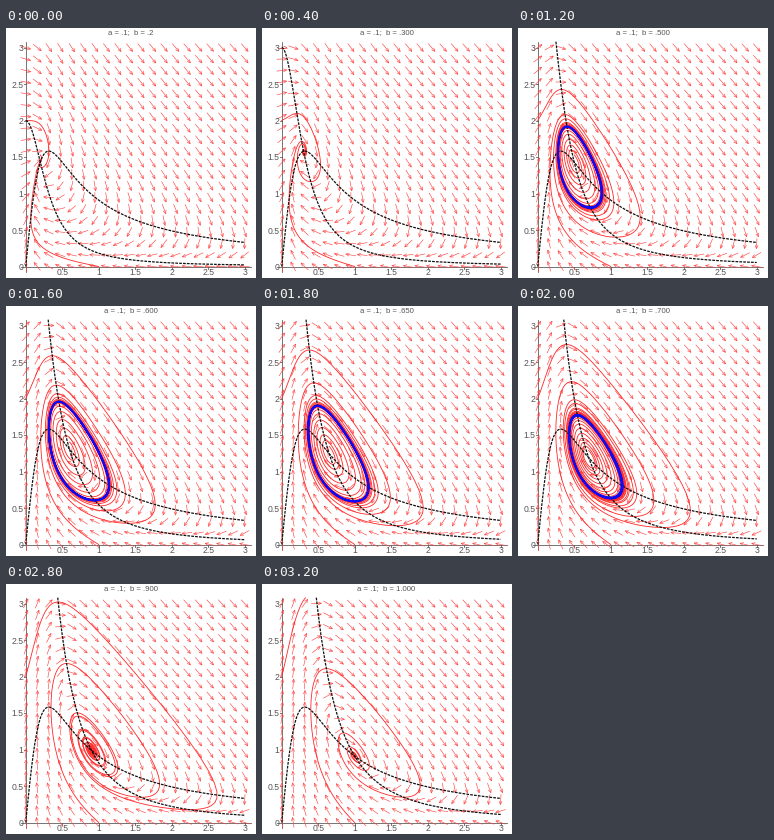
Recreate the animation shown at these times as a matplotlib script. Size 250x250 px, loop 3.3 s.

```python
import numpy as np
import matplotlib
import matplotlib.pyplot as plt
from matplotlib.animation import FuncAnimation
from matplotlib.collections import LineCollection

matplotlib.rcParams["font.family"] = "Liberation Sans"

SIZE, DPI = 250, 100
PX = 72 / DPI                      # points per pixel
SCALE, X0, Y0 = 73.0, 19.7, 238.5  # pixels per unit, origin
LOW, TOP = -0.07, 3.08
FRAMES, STEP_MS = 33, 100
A = 0.1
B = 0.2 + 0.025 * np.arange(FRAMES)
DT, T_LATE, T_END = 0.05, 75, 100
GREY = "#555"


def field(x, y, b):
    flow = A * y + x * x * y
    return -x + flow, b - flow


def integrate():
    """RK4 paths for every b, three starting points each."""
    b = B[:, None]
    start_x = np.column_stack([0 * B, 0 * B + 1, B])
    start_y = np.column_stack([0 * B + 2, 0 * B, B / (A + B**2) + 0.1])
    p = np.array([start_x, start_y])

    def rate(q):
        return np.array(field(q[0], q[1], b))

    path = [p]
    for _ in range(int(T_END / DT)):
        k1 = rate(p)
        k2 = rate(p + DT / 2 * k1)
        k3 = rate(p + DT / 2 * k2)
        k4 = rate(p + DT * k3)
        p = p + DT / 6 * (k1 + 2 * k2 + 2 * k3 + k4)
        path.append(p)
    return np.array(path)


paths = integrate()
late_at = int(T_LATE / DT)

fig = plt.figure(figsize=(SIZE / DPI, SIZE / DPI), dpi=DPI, facecolor="white")
ax = fig.add_axes([0, 0, 1, 1])
ax.set_xlim(-X0 / SCALE, (SIZE - X0) / SCALE)
ax.set_ylim((Y0 - SIZE) / SCALE, Y0 / SCALE)
ax.axis("off")

# axes, ticks and labels
rule = dict(color=GREY, lw=0.8 * PX, zorder=1)
ax.plot([LOW, TOP], [0, 0], **rule)
ax.plot([0, 0], [LOW, TOP], **rule)
tick, gap = 2 / SCALE, 2.2 / SCALE
font = dict(fontsize=8.6 * PX, color=GREY)
for v in np.arange(0.5, 3.1, 0.5):
    ax.plot([v, v], [0, -tick], **rule)
    ax.plot([0, -tick], [v, v], **rule)
    ax.text(v, -5.6 / SCALE, f"{v:g}", ha="center", va="center", **font)
    ax.text(-gap, v, f"{v:g}", ha="right", va="center_baseline", **font)
ax.text(-gap, 0, "0", ha="right", va="center_baseline", **font)
title = ax.text((124.5 - X0) / SCALE, (Y0 - 6.2) / SCALE, "", ha="center",
                va="baseline", fontsize=7.8 * PX, color=GREY)

# direction field
grid = np.linspace(0, 3, 20)
gx, gy = (g.ravel() for g in np.meshgrid(grid, grid))
HALF, HEAD, WING = 5.1 / SCALE, 3.4 / SCALE, 1.5 / SCALE
arrows = LineCollection([], colors="#ff4040", linewidths=0.6 * PX, zorder=2)
ax.add_collection(arrows, autolim=False)


def arrow_lines(b):
    u, v = field(gx, gy, b)
    d = np.column_stack([u, v]) / np.maximum(np.hypot(u, v), 1e-9)[:, None]
    n = np.column_stack([-d[:, 1], d[:, 0]])
    mid = np.column_stack([gx, gy])
    tip, tail = mid + HALF * d, mid - HALF * d
    neck = tip - HEAD * d
    shafts = np.stack([tail, tip], axis=1)
    heads = np.stack([neck + WING * n, tip, neck - WING * n], axis=1)
    return list(shafts) + list(heads)


reds = [ax.plot([], [], color="#ff2a2a", lw=0.85 * PX, zorder=3)[0]
        for _ in range(3)]
dash = dict(color="#111", lw=1.25 * PX, dashes=(2.2, 0.9), zorder=4)
xs = np.linspace(0, 3, 400)
ax.plot(xs, xs / (A + xs**2), **dash)
null_y, = ax.plot([], [], **dash)
blue, = ax.plot([], [], color="#1008f0", lw=1.9 * PX, zorder=5,
                solid_capstyle="butt")


def draw(i):
    b = B[i]
    label = ".2" if i == 0 else f"{b:.3f}".removeprefix("0")
    title.set_text(f"a = .1;  b = {label}")
    arrows.set_segments(arrow_lines(b))

    first = np.sqrt(max(b / TOP - A, 0))
    x = np.linspace(first, 3, 400)
    null_y.set_data(x, b / (A + x**2))

    for k, line in enumerate(reds):
        x, y = paths[:late_at, 0, i, k], paths[:late_at, 1, i, k]
        out = np.flatnonzero(y > TOP)
        end = out[0] if out.size else len(y)   # a path ends where it leaves
        line.set_data(x[:end], y[:end])

    late = paths[late_at:, :, i, 2]
    seen = np.ptp(late[:, 1]) * SCALE > 0.5
    blue.set_data(*(late.T if seen else ([], [])))
    return [title, arrows, null_y, blue, *reds]


anim = FuncAnimation(fig, draw, frames=FRAMES, interval=STEP_MS,
                     repeat=True, repeat_delay=0, blit=False)
plt.show()
```
